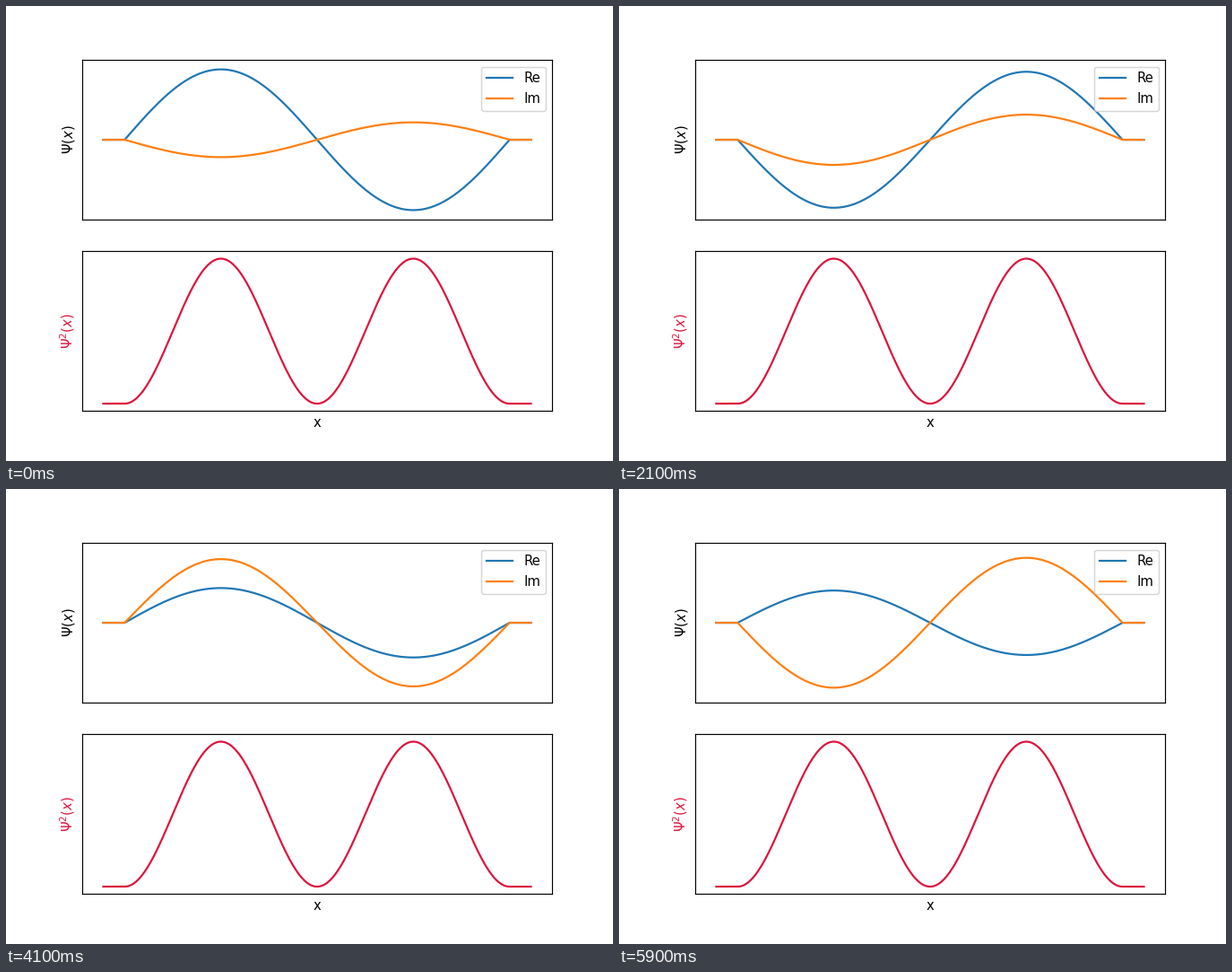
Write a matplotlib script that moves like this. It is 677 by 507 pixels and loops after 6000 ms.

```python
import numpy as np
import matplotlib.pyplot as plt
from matplotlib.animation import FuncAnimation

WIDTH, HEIGHT = 677, 507
DPI = WIDTH / 6.4
FRAMES, INTERVAL = 60, 100
PHASE_STEP = 0.1212
EPS = 1e-6  # keeps the pixel size from rounding down

plt.rcParams["font.family"] = "DejaVu Sans"

# Second eigenstate of an infinite well on 0..1, zero outside the walls
margin = 1 / 18
x = np.linspace(-margin, 1 + margin, 1001)
psi = np.where((x > 0) & (x < 1), np.sin(2 * np.pi * x), 0)

fig, (wave_ax, density_ax) = plt.subplots(
    2, 1, figsize=((WIDTH + EPS) / DPI, (HEIGHT + EPS) / DPI), dpi=DPI)
stretch = 4.8 * DPI / HEIGHT
fig.subplots_adjust(left=0.125, right=0.9, bottom=0.11 * stretch,
                    top=0.88 * stretch, hspace=0.2)

for ax in (wave_ax, density_ax):
    ax.set(xticks=[], yticks=[])
    ax.margins(0.05)

real_line, = wave_ax.plot(x, psi, color="tab:blue", label="Re")
imag_line, = wave_ax.plot(x, 0 * psi, color="tab:orange", label="Im")
wave_ax.set_ylim(-1.1, 1.1)
wave_ax.set_ylabel(r"$\Psi(x)$")
wave_ax.legend(loc="upper right")

density_ax.plot(x, psi ** 2, color="crimson")
density_ax.set_ylim(-0.05, 1.05)
density_ax.set_ylabel(r"$\Psi^2(x)$", color="crimson")
density_ax.set_xlabel("x")


def update(frame):
    phase = PHASE_STEP * (frame + 2)
    real_line.set_ydata(psi * np.cos(phase))
    imag_line.set_ydata(-psi * np.sin(phase))
    return real_line, imag_line


anim = FuncAnimation(fig, update, frames=FRAMES, interval=INTERVAL,
                     repeat=True, repeat_delay=0)
plt.show()
```
